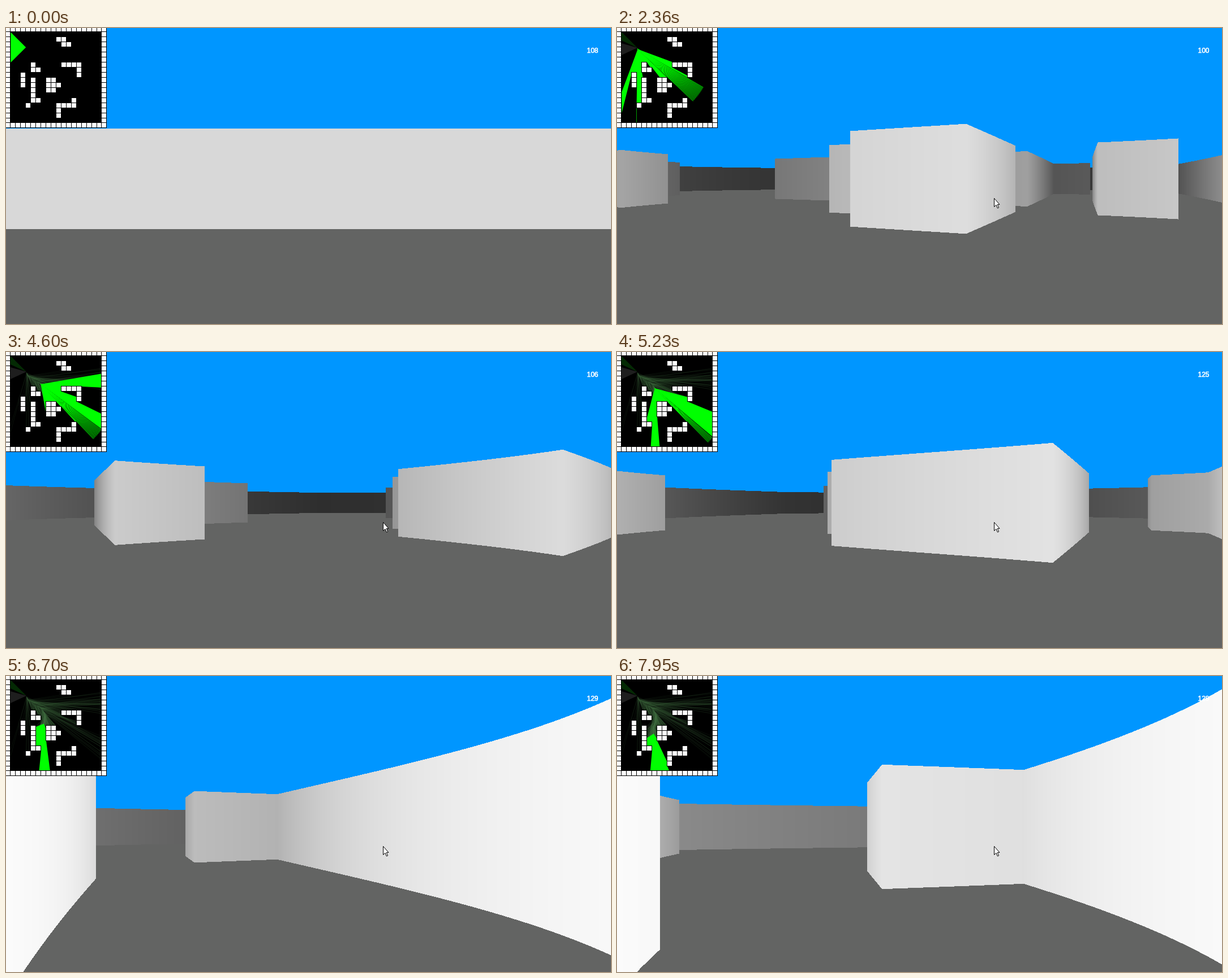
An HTML page with a canvas that plays this animation: 1069x524 px, repeating every 8 s.

```html
<!DOCTYPE html>
<html lang="en">
<head>
<meta charset="utf-8">
<title>Raycast walk</title>
<style>
html, body { margin: 0; width: 100%; height: 100%; overflow: hidden; background: #636463; }
canvas { display: block; }
</style>
</head>
<body>
<canvas id="view" width="1069" height="524"></canvas>
<script>
const W = 1069, H = 524, LOOP = 8000;
const HORIZON = 267, SCALE = 536, FOV = Math.PI / 2, REACH = 15;
const CELL = 8.95, STEP = 69.64, BASE = 2100;
const SPEED = 0.112, TURN = 9.5, FIRST = -12, LAST = 84;
const ctx = document.getElementById('view').getContext('2d');

const grid = `
####################
#..................#
#.........##.......#
#..........##......#
#..................#
#..................#
#..................#
#....#.....####....#
#....##.......#....#
#..#..........#....#
#..#.#..##.........#
#..#.#..###........#
#....#..##.........#
#....#.............#
#....##......#.....#
#...#.....####.....#
#.........#........#
#.........#........#
#..................#
####################`.trim().split('\n');
const isWall = (c, r) => grid[r][c] === '#';

// Step at which the walker starts turning, and the heading it turns to
const turns = [
  [FIRST, 65.5], [6.1, 35], [37, 60], [47.85, 91.2], [60.6, 114.2], [70.3, 88], [82.4, 103.1]
];
// Step, frames per second
const rate = [[4, 100], [18, 93], [36, 106], [54, 144], [66, 129]];

const clamp = (v, lo, hi) => Math.min(hi, Math.max(lo, v));

function ease(t, from, span) {
  const k = clamp((t - from) / span, 0, 1);
  return k * k * (3 - 2 * k);
}

function heading(step) {
  let deg = 180;
  for (const [at, to] of turns) {
    const room = TURN * Math.max(0, step - at);
    deg += clamp(to - deg, -room, room);
  }
  return deg * Math.PI / 180;
}

// Constant speed along the heading, kept once per whole step
function walk() {
  const path = [], parts = 40;
  let x = 4, y = 4;
  for (let i = FIRST * parts; i <= LAST * parts; i++) {
    const step = i / parts;
    if (i % parts === 0) path.push({ x, y, dir: heading(step) });
    if (step < 0.5) continue;
    const mid = heading(step + 0.5 / parts);
    x += Math.cos(mid) * SPEED / parts;
    y += Math.sin(mid) * SPEED / parts;
  }
  return path;
}
const path = walk();
const poseAt = step => path[clamp(step, FIRST, LAST) - FIRST];

function rateAt(step) {
  if (step <= FIRST) return 108;
  const i = rate.findIndex(key => key[0] >= step);
  if (i < 1) return rate[i < 0 ? rate.length - 1 : 0][1];
  const [s0, v0] = rate[i - 1], [s1, v1] = rate[i];
  return Math.round(v0 + (v1 - v0) * (step - s0) / (s1 - s0));
}

// Walks the grid cell by cell until a wall or the reach limit
function cast({ x, y }, angle) {
  const dx = Math.cos(angle), dy = Math.sin(angle);
  const stepX = Math.abs(1 / dx), stepY = Math.abs(1 / dy);
  let c = Math.floor(x), r = Math.floor(y);
  let nextX = (dx > 0 ? c + 1 - x : x - c) * stepX;
  let nextY = (dy > 0 ? r + 1 - y : y - r) * stepY;
  for (;;) {
    let d;
    if (nextX < nextY) { d = nextX; nextX += stepX; c += Math.sign(dx); }
    else { d = nextY; nextY += stepY; r += Math.sign(dy); }
    if (d >= REACH) return { angle, d: REACH, hit: false };
    if (isWall(c, r)) return { angle, d, hit: true };
  }
}

function drawScene(pose) {
  ctx.fillStyle = '#0096ff';
  ctx.fillRect(0, 0, W, HORIZON);
  ctx.fillStyle = '#636463';
  ctx.fillRect(0, HORIZON, W, H - HORIZON);
  const rays = [];
  for (let x = 0; x < W; x++) {
    const off = ((x + 0.5) / W - 0.5) * FOV;
    const ray = cast(pose, pose.dir + off);
    const depth = ray.d * Math.cos(off);
    const half = SCALE / depth / 2;
    const top = Math.round(HORIZON - half), bottom = Math.round(HORIZON + half);
    const tone = Math.round(255 / (1 + depth * depth * 0.02));
    ctx.fillStyle = `rgb(${tone},${tone},${tone})`;
    ctx.fillRect(x, top, 1, bottom - top);
    rays.push(ray);
  }
  return rays;
}

const mapX = x => x * CELL - 0.6;
const mapY = y => y * CELL - 1.6;
const noise = n => { const v = Math.sin(n * 127.1) * 43758.5; return v - Math.floor(v); };

function lineTo(pose, angle, d) {
  ctx.lineTo(mapX(pose.x + Math.cos(angle) * d), mapY(pose.y + Math.sin(angle) * d));
}

function strokeRay(pose, { angle, d }) {
  ctx.moveTo(mapX(pose.x), mapY(pose.y));
  lineTo(pose, angle, d);
}

function wedge(y1, y2, color) {
  ctx.fillStyle = color;
  ctx.beginPath();
  ctx.moveTo(36, 35);
  ctx.lineTo(8, y1);
  ctx.lineTo(8, y2);
  ctx.fill();
}

// Faint leftovers of earlier fans
function drawTrails(step) {
  if (step <= -8) return;
  wedge(7, 22, '#042a04');
  wedge(27, 48, '#1e1e1e');
  ctx.strokeStyle = 'rgba(70,120,70,0.13)';
  ctx.lineWidth = 1;
  for (let s = 3; s < step; s++) {
    const pose = poseAt(s);
    ctx.beginPath();
    for (let i = 0; i < 8; i++) {
      const ray = cast(pose, pose.dir + (noise(s * 8 + i) - 0.5) * FOV);
      if (ray.hit) strokeRay(pose, ray);
    }
    ctx.stroke();
  }
}

function drawFan(pose, rays) {
  ctx.fillStyle = ctx.strokeStyle = '#00ff00';
  ctx.beginPath();
  ctx.moveTo(mapX(pose.x), mapY(pose.y));
  for (const { angle, d, hit } of rays) lineTo(pose, angle, hit ? d : 0);
  ctx.fill();
  ctx.lineWidth = 1;
  ctx.beginPath();
  rays.forEach((ray, i) => { if (!ray.hit && i % 9 === 0) strokeRay(pose, ray); });
  ctx.stroke();
}

function drawMap(pose, rays, step) {
  ctx.save();
  ctx.beginPath();
  ctx.rect(0, 0, 178, 177);
  ctx.clip();
  ctx.fillStyle = '#000';
  ctx.fillRect(0, 0, 178, 177);
  drawTrails(step);
  drawFan(pose, rays);
  grid.forEach((row, r) => {
    for (let c = 0; c < row.length; c++) {
      if (!isWall(c, r)) continue;
      const x = Math.round(mapX(c)), y = Math.round(mapY(r));
      ctx.fillStyle = '#000';
      ctx.fillRect(x - 1, y - 1, 10, 10);
      ctx.fillStyle = '#fff';
      ctx.fillRect(x, y, 8, 8);
    }
  });
  ctx.restore();
}

function drawRate(step) {
  const text = String(rateAt(step));
  ctx.font = '12px "Liberation Sans", Arial, sans-serif';
  ctx.fillStyle = ctx.strokeStyle = '#fff';
  ctx.lineWidth = 0.6;
  ctx.fillText(text, 1026.5, 44);
  ctx.strokeText(text, 1026.5, 44);
}

const arrow = new Path2D('M.5 .5V15.5L4 12.3L6.4 18L8.6 17L6.2 11.4H10Z');
function drawPointer(t) {
  if (t < 130) return;
  const sway = Math.sin(Math.PI * clamp((t - 520) / 750, 0, 1));
  const x = 666 - 11 * sway;
  const y = 433 - 142 * ease(t, 130, 250) - 10 * sway + 10 * ease(t, 1270, 230);
  ctx.save();
  ctx.translate(Math.round(x), Math.round(y));
  ctx.fillStyle = '#fff';
  ctx.strokeStyle = '#000';
  ctx.lineWidth = 1;
  ctx.fill(arrow);
  ctx.stroke(arrow);
  ctx.restore();
}

function draw(t) {
  const step = Math.floor((t - BASE) / STEP + 0.3);
  const pose = poseAt(step);
  const rays = drawScene(pose);
  drawMap(pose, rays, step);
  drawRate(step);
  drawPointer(t);
}

const start = performance.now();
function tick() {
  draw((performance.now() - start) % LOOP);
  requestAnimationFrame(tick);
}
tick();
</script>
</body>
</html>
```
